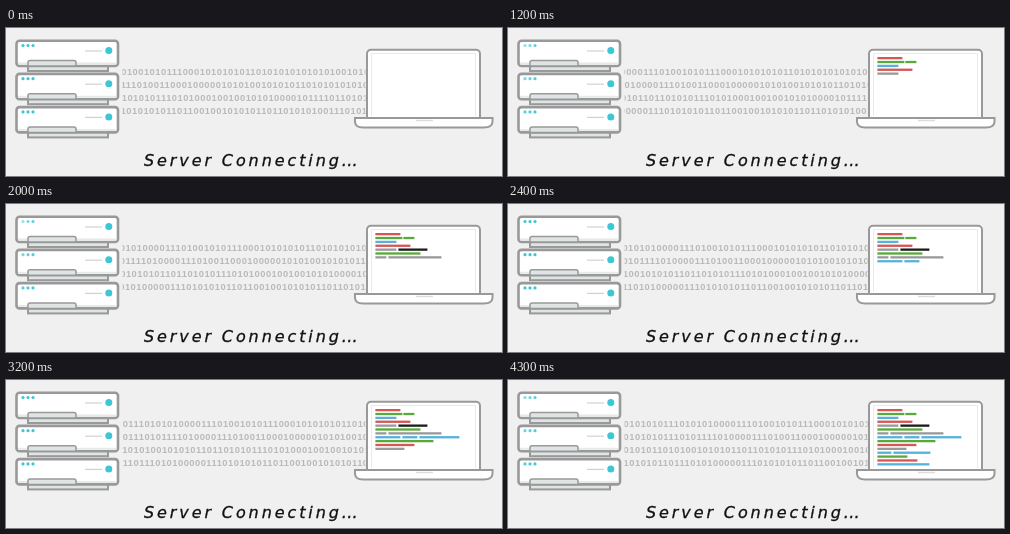
Write an HTML page that moves like this. It is 496x148 px and loops after 4400 ms.

```html
<!DOCTYPE html>
<html lang="en">
<head>
<meta charset="utf-8">
<title>Server Connecting</title>
<style>
  html, body { margin: 0; width: 100%; height: 100%; overflow: hidden; background: #f0f0f0; }
  svg { display: block; width: 496px; height: 148px; }
  .outline { fill: #fff; stroke: #999; stroke-width: 2.6; }
  .thin { stroke-width: 2; }
  .bits { font: bold 9.3px "Liberation Sans", Arial, sans-serif; letter-spacing: .51px; fill: #b9b9b9; }
  .caption { font: oblique 16px "DejaVu Sans", sans-serif; letter-spacing: 2.9px; fill: #111; stroke: #111; stroke-width: .3; }
  .dots { letter-spacing: .3px; }
</style>
</head>
<body>
<svg viewBox="0 0 496 148">
  <defs>
    <clipPath id="cable"><rect x="116.5" y="36" width="243" height="54"/></clipPath>
    <g id="server">
      <rect x="22" y="26" width="80" height="17" fill="#dfe5e5" stroke="#999" stroke-width="2"/>
      <rect class="outline" x="10.5" y="12.7" width="101.5" height="25.3" rx="3"/>
      <path d="M12 34.5H110.5V36.5H12Z" fill="#e6eaea"/>
      <path d="M22 38V34.5Q22 32.5 24 32.5H68Q70 32.5 70 34.5V38Z" fill="#dfe5e5" stroke="#999" stroke-width="1.5"/>
      <path d="M79 23H96" stroke="#d2d2d2" stroke-width="1.2"/>
      <circle cx="102.8" cy="22.5" r="3.5" fill="#3ec6d2"/>
    </g>
  </defs>

  <g id="rack"></g>
  <g clip-path="url(#cable)"><g class="bits" id="stream"></g></g>

  <rect class="outline thin" x="361" y="21.8" width="113" height="72" rx="4"/>
  <path d="M365.5 88V25.5H469.5V88" fill="none" stroke="#e1eeee"/>
  <path class="outline thin" d="M349 90H486.5V94Q486 99.5 478 99.5H357Q349.5 99.5 349 94Z"/>
  <path d="M410 92.5H427" stroke="#ddd" stroke-width="1.5"/>
  <g id="code"></g>

  <text class="caption" x="138" y="138">Server Connecting<tspan class="dots">...</tspan></text>
</svg>
<script>
  const LOOP = 4400, STEP = 100;
  const $ = id => document.getElementById(id);

  function add(parent, tag, attrs, text = '') {
    const node = document.createElementNS('http://www.w3.org/2000/svg', tag);
    for (const key in attrs) node.setAttribute(key, attrs[key]);
    node.textContent = text;
    return parent.appendChild(node);
  }

  // Three servers, each with three status lights of different depth.
  const lights = [];
  for (let s = 0; s < 3; s++) {
    const unit = add($('rack'), 'g', { transform: `translate(0 ${s * 33.2})` });
    add(unit, 'use', { href: '#server' });
    for (let d = 0; d < 3; d++) {
      const node = add(unit, 'circle', { cx: 17 + d * 5, cy: 17.5, r: 1.6, fill: '#3ec6d2' });
      lights.push({ node, depth: (.45 - .15 * s) * (1 - .3 * d) });
    }
  }

  const rows = [
    '01010101110101010000' + '111010010101110001010101011010101010101010010101',
    '01010101110101111010000' + '111010011000100000101010010101011010101010101',
    '01010110101001010101101101010' + '111010100010010010101000010111101101010',
    '101010110111010100000' + '11101010101101100100101010110110101010011101011101'
  ];
  rows.forEach((bits, i) => add($('stream'), 'text', { x: 0, y: 47 + i * 12.9 }, bits));

  const red = '#d65656', green = '#58a93a', blue = '#55b2d8', gray = '#999', black = '#1c1c1c';
  // Each line is a list of [start, end, colour] dashes.
  const lines = [
    [[369, 394, red]],
    [[369, 396, green], [397, 408, green]],
    [[369, 390, blue]],
    [[369, 404, red]],
    [[369, 390, gray], [392, 421, black]],
    [[369, 414, green]],
    [[369, 380, gray], [382, 435, gray]],
    [[369, 394, blue], [396, 411, blue], [413, 453, blue]],
    [[369, 427, green]],
    [[369, 408, red]],
    [[369, 398, gray]],
    [[369, 383, blue], [385, 422, blue]],
    [[369, 399, green]],
    [[369, 409, red]],
    [[369, 421, blue]]
  ];
  const dashes = lines.flatMap((line, row) => line.map(([from, to, fill]) =>
    add($('code'), 'rect', { x: from + .4, y: 29 + row * 3.87, width: to - from, height: 2.3, fill })));

  function draw(now) {
    const t = Math.floor((now % LOOP) / STEP) * STEP;
    $('stream').setAttribute('transform', `translate(${-13.4 + t * .03} 0)`);
    const dip = Math.sin(Math.PI * t / 800) ** 2;
    lights.forEach(({ node, depth }) => node.setAttribute('opacity', 1 - depth * dip));
    dashes.forEach((dash, i) =>
      dash.setAttribute('visibility', t >= (i + 1) * 200 ? 'visible' : 'hidden'));
    $('code').style.filter = t < 600 ? 'brightness(.75) saturate(.75)' : 'none';
    requestAnimationFrame(() => draw(performance.now()));
  }
  draw(0);
</script>
</body>
</html>
```
